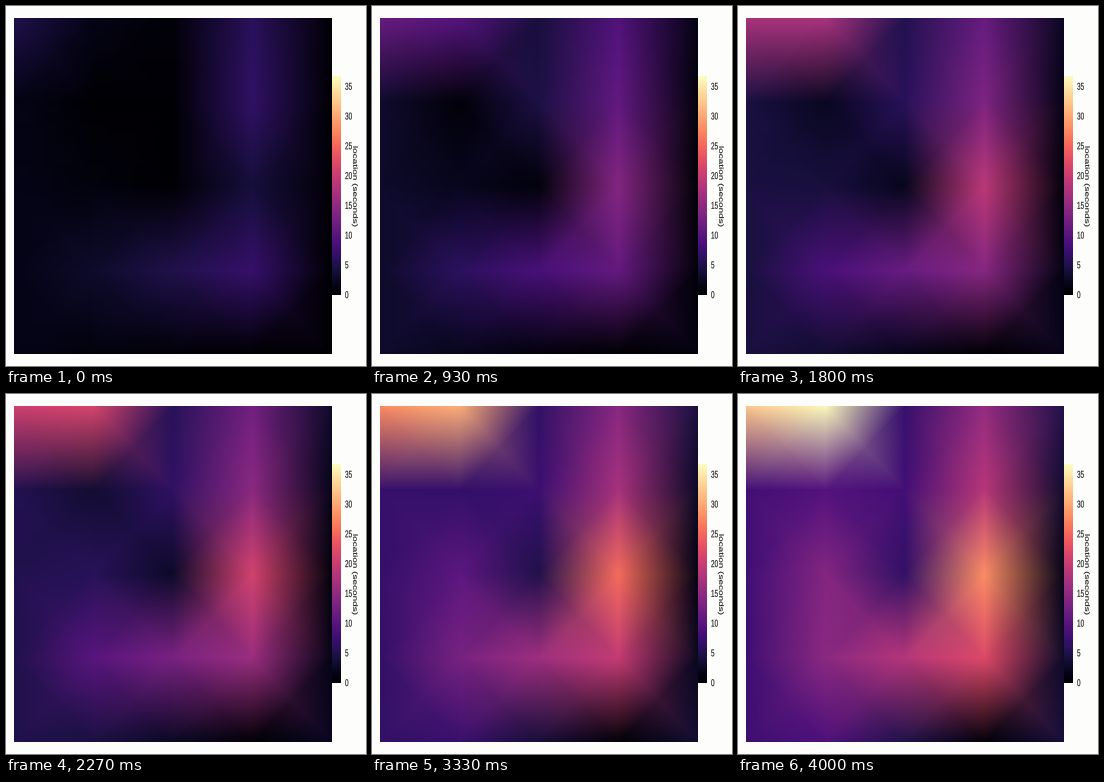
Recreate the animation shown at these times as a matplotlib script. Size 360 by 360 pixels, loop 4.34 s.

```python
import numpy as np
import matplotlib.pyplot as plt
from matplotlib.animation import FuncAnimation
from matplotlib.patches import PathPatch, Rectangle
from matplotlib.textpath import TextPath
from matplotlib.transforms import Affine2D

SIZE = 360
LOOP, INTERVAL = 4340, 20
FPS, STEPS = 15, 60         # the occupancy updates 15 times per second
NODES = 5                   # the arena is sampled on a 5 by 5 grid
LEFT, TOP, RIGHT, BOTTOM = 8, 12, 326, 348
BAR_TOP, BAR_BOTTOM = 70.5, 289
VMAX = 36.7                 # seconds at the top of the colour scale
SQUEEZE = 0.64              # the lettering is condensed horizontally
INK = "#202020"

plt.rcParams["font.family"] = "Liberation Sans"

# Legs walked through the arena: both end nodes (col, row), seconds at
# those ends when the loop begins and ends, and the pace of the growth
# (below 1 grows early, above 1 grows late).
LEGS = [
    ((0, 0), (1, 0), (5, 1.5), (32.5, 36.5), 1),
    ((0, 1), (0, 4), (1.5, 1.5), (8, 7.5), 1),
    ((1, 1), (1, 2), (0, 1), (9.5, 14), 1.8),
    ((2, 0), (2, 1), (0.5, 0), (7, 8), 0.4),
    ((2, 2), (2, 2), (0, 0), (6.5, 6.5), 1.5),
    ((3, 0), (3, 1), (6, 6.5), (15.5, 18.5), 0.7),
    ((3, 2), (3, 2), (4, 4), (28, 28), 0.6),
    ((1, 3), (3, 3), (3, 7), (14.5, 22), 0.9),
    ((1, 4), (3, 4), (1, 0), (9, 0.5), 1.5),
    ((4, 0), (4, 2), (0, 0), (5, 1.5), 1),
    ((4, 2), (4, 4), (0, 0), (1.5, 4), 1),
]


def occupancy(step):
    """Seconds spent at each node; values run evenly along every leg."""
    grid = np.zeros((NODES, NODES))
    for (c0, r0), (c1, r1), start, end, pace in LEGS:
        grown = (step / STEPS) ** pace
        ends = np.array(start) + (np.array(end) - start) * grown
        part = grid[r0:r1 + 1, c0:c1 + 1]
        part[:] = np.linspace(*ends, part.size).reshape(part.shape)
    return grid


fig = plt.figure(figsize=(SIZE / 100, SIZE / 100), dpi=100, facecolor="#fdfefc")
ax = fig.add_axes([0, 0, 1, 1])
ax.axis("off")

mesh = ax.pcolormesh(np.linspace(LEFT, RIGHT, NODES),
                     np.linspace(TOP, BOTTOM, NODES), occupancy(0),
                     shading="gouraud", cmap="magma", vmin=0, vmax=VMAX)
mesh.set_clip_path(Rectangle((LEFT, BOTTOM), RIGHT - LEFT, TOP - BOTTOM,
                             transform=ax.transData))
ax.imshow(np.linspace(1, 0, 256)[:, None], cmap="magma", aspect="auto",
          extent=(RIGHT, 334.3, BAR_BOTTOM, BAR_TOP), interpolation="bilinear")
ax.set_xlim(0, SIZE)
ax.set_ylim(SIZE, 0)


def lettering(text, x, y, vertical=False):
    path = TextPath((0, 0), text, size=10)
    box = path.get_extents()
    yc = (box.y0 + box.y1) / 2
    if vertical:
        place = Affine2D().translate(-(box.x0 + box.x1) / 2, -yc)
        place += Affine2D([[0, 1, 0], [1, 0, 0], [0, 0, 1]])
    else:
        place = Affine2D().translate(0, -yc).scale(1, -1)
    place += Affine2D().scale(SQUEEZE, 1).translate(x, y)
    ax.add_patch(PathPatch(place.transform_path(path), fc=INK, ec=INK, lw=0.1))


for sec in range(0, 36, 5):
    height = (BAR_BOTTOM - BAR_TOP) * sec / VMAX
    lettering(str(sec), 339, BAR_BOTTOM - 0.3 - height)
lettering("location (seconds)", 348.8, 180.5, vertical=True)


def update(i):
    # the small lead keeps each update on its 10 ms time slot
    step = min(STEPS, int((i * INTERVAL + 13.4) * FPS / 1000))
    mesh.set_array(occupancy(step))
    return [mesh]


anim = FuncAnimation(fig, update, frames=LOOP // INTERVAL, interval=INTERVAL,
                     repeat=True, repeat_delay=0)
plt.show()
```
